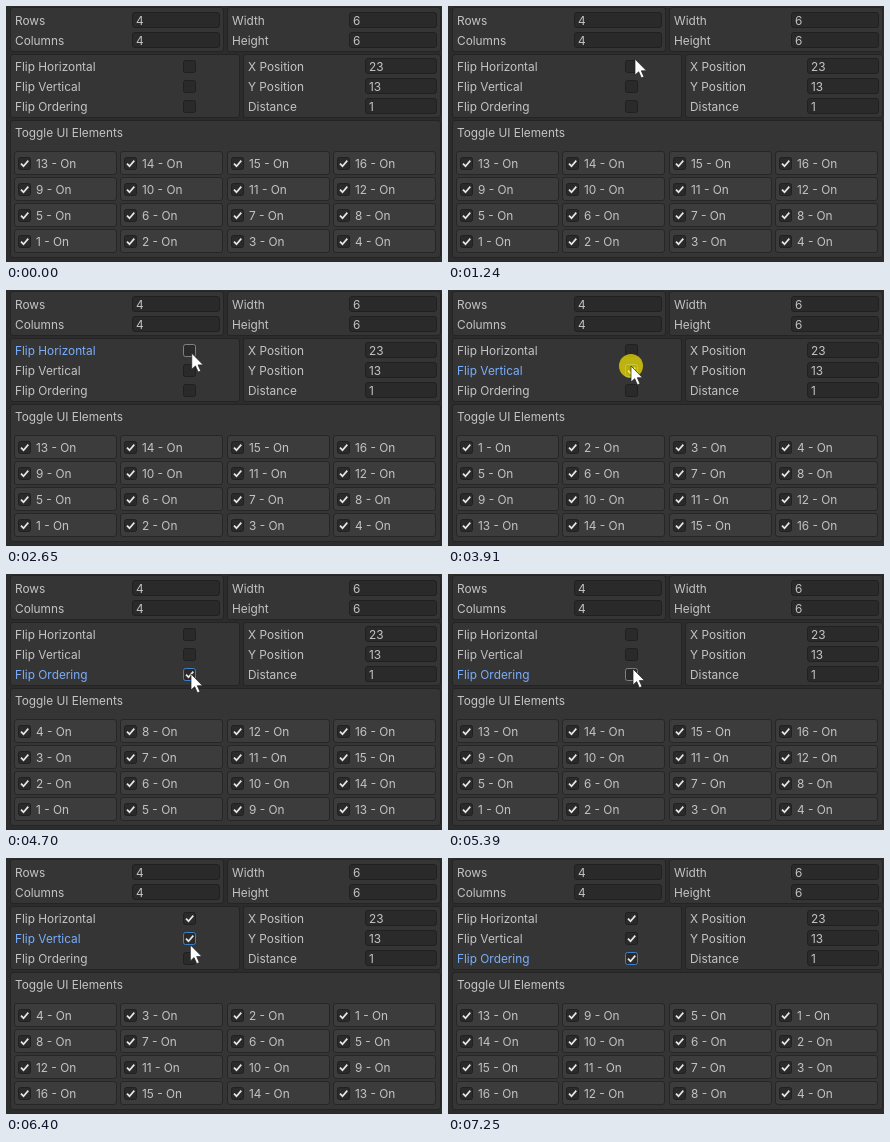
Write an HTML page that moves like this. It is 436x256 px and loops after 8070 ms.

```html
<!DOCTYPE html>
<html lang="en">
<head>
<meta charset="utf-8">
<title>Toggle grid</title>
<style>
  html, body { margin: 0; width: 100%; height: 100%; overflow: hidden; background: #2c2c2c; }
  svg { display: block; width: 100vw; height: 100vh; }
  text { font: 11.85px Inter, Roboto, sans-serif; fill: #c4c4c4; white-space: pre; }
  .panel { fill: #353535; stroke: #242424; }
  .item { fill: #3c3c3c; stroke: #262626; }
  .field { fill: #2a2a2a; stroke: #202020; }
  .tick { fill: none; stroke: #e6e6e6; stroke-width: 1.7; }
</style>
</head>
<body>
<svg id="stage" viewBox="0 0 436 256"></svg>
<script>
const LOOP = 8070;
const stage = document.getElementById('stage');

function add(tag, attrs, content) {
  const node = document.createElementNS('http://www.w3.org/2000/svg', tag);
  for (const key in attrs) node.setAttribute(key, attrs[key]);
  if (content !== undefined) node.textContent = content;
  return stage.appendChild(node);
}

// Pixel-aligned rounded box with a 1px border inside its bounds
const box = (cls, x, y, w, h, rx = 2.5) =>
  add('rect', { class: cls, x: x + .5, y: y + .5, width: w - 1, height: h - 1, rx });

const label = (x, y, content) => add('text', { x, y }, content);

function checkbox(x, y) {
  const frame = box('field', x, y, 13, 13, 2);
  const tick = add('path', { class: 'tick', d: `M${x + 3} ${y + 6.6}l2.5 2.6 4.8 -5.6` });
  return { x, y, w: 13, h: 13, frame, tick };
}

const fields = [];
function field(name, x, y, value, fx, fw) {
  label(x, y + 13, name);
  fields.push({ x: fx, y, w: fw, h: 16, frame: box('field', fx, y, fw, 16) });
  label(fx + 4, y + 13, value);
}

add('rect', { width: 436, height: 256, fill: '#2c2c2c' });
add('rect', { y: 255, width: 436, height: 1, fill: '#30262a' });
box('panel', 4, 1, 214, 45);
box('panel', 221, 1, 214, 45);
box('panel', 4, 48, 230, 64);
box('panel', 237, 48, 198, 64);
box('panel', 4, 114, 431, 138);

field('Rows', 9, 6, 4, 126, 88);
field('Columns', 9, 26, 4, 126, 88);
field('Width', 226, 6, 6, 343, 88);
field('Height', 226, 26, 6, 343, 88);
field('X Position', 242, 52, 23, 359, 72);
field('Y Position', 242, 72, 13, 359, 72);
field('Distance', 242, 92, 1, 359, 72);

const flips = ['Horizontal', 'Vertical', 'Ordering'].map((name, i) => ({
  text: label(9, 65 + 20 * i, 'Flip ' + name),
  ...checkbox(177, 54 + 20 * i)
}));

label(9, 131, 'Toggle UI Elements');
const items = [];
for (let row = 0; row < 4; row++) {
  for (let col = 0; col < 4; col++) {
    const x = Math.round(8 + 106.4 * col), y = 145 + 26 * row;
    box('item', x, y, 103, 24);
    const { frame } = checkbox(x + 4, y + 6);
    items.push({ row, col, x, y, w: 103, h: 24, frame, text: label(x + 22, y + 17, '') });
  }
}

const halo = add('circle', { r: 12, fill: '#ffee00', opacity: .68 });
const cursor = add('path', {
  d: 'M0 0V16L3.7 12.7 6.4 18.8 9 17.7 6.3 11.7H11.5Z',
  fill: '#fff', stroke: '#222', 'stroke-width': .7
});

// Mouse down, mouse up, flip index
const clicks = [
  [1530, 1630, 0], [2350, 2450, 0], [3180, 3310, 1],
  [3910, 4010, 1], [4640, 4700, 2], [5260, 5350, 2],
  [5920, 6020, 0], [6220, 6320, 1], [6590, 6690, 2]
];

// Time, x, y of the pointer
const path = [
  [940, 196, -5], [1060, 192, 24], [1240, 187, 53], [1330, 186, 62],
  [2640, 186, 62], [2770, 183, 76],
  [4010, 183, 76], [4170, 184, 100], [4309, 184, 100], [4310, 185, 100],
  [5350, 185, 100], [5670, 185, 60],
  [6020, 185, 60], [6170, 184, 79],
  [6340, 184, 79], [6510, 185, 101],
  [7130, 185, 101], [7210, 172, 197], [7250, 172, 198]
];

function pointerAt(t) {
  const i = path.findIndex(p => p[0] > t);
  if (t < 950 || i < 1) return null;
  const [t0, x0, y0] = path[i - 1], [t1, x1, y1] = path[i];
  const k = (t - t0) / (t1 - t0);
  return { x: x0 + (x1 - x0) * k, y: y0 + (y1 - y0) * k };
}

const over = (r, p) => p && p.x >= r.x && p.x < r.x + r.w && p.y >= r.y && p.y < r.y + r.h;
const outline = (part, p) => { part.frame.style.stroke = over(part, p) ? '#707070' : ''; };

function cellNumber(row, col, [horizontal, vertical, ordering]) {
  const c = horizontal ? 3 - col : col;
  const r = vertical ? row : 3 - row;
  return (ordering ? c * 4 + r : r * 4 + c) + 1;
}

function render(t) {
  const on = [false, false, false];
  let focus = -1, pressed = false;
  for (const [down, up, i] of clicks) {
    if (t >= down) focus = i;
    if (t >= up) on[i] = !on[i];
    if (t >= down && t < up) pressed = true;
  }

  const p = pointerAt(t);
  fields.forEach(f => outline(f, p));
  flips.forEach((f, i) => {
    const focused = i === focus;
    f.text.style.fill = focused ? '#7baefa' : '';
    f.tick.style.display = on[i] ? '' : 'none';
    f.frame.style.stroke = focused && on[i] ? '#3f7fc8' : focused || over(f, p) ? '#808080' : '';
  });
  items.forEach(item => {
    item.text.textContent = cellNumber(item.row, item.col, on) + ' - On';
    outline(item, p);
  });

  cursor.style.display = p ? '' : 'none';
  halo.style.display = p && pressed ? '' : 'none';
  if (p) {
    cursor.setAttribute('transform', `translate(${p.x} ${p.y})`);
    halo.setAttribute('cx', p.x);
    halo.setAttribute('cy', p.y);
  }
}

const start = performance.now();
function tick() {
  render((performance.now() - start) % LOOP);
  requestAnimationFrame(tick);
}
tick();
</script>
</body>
</html>
```
